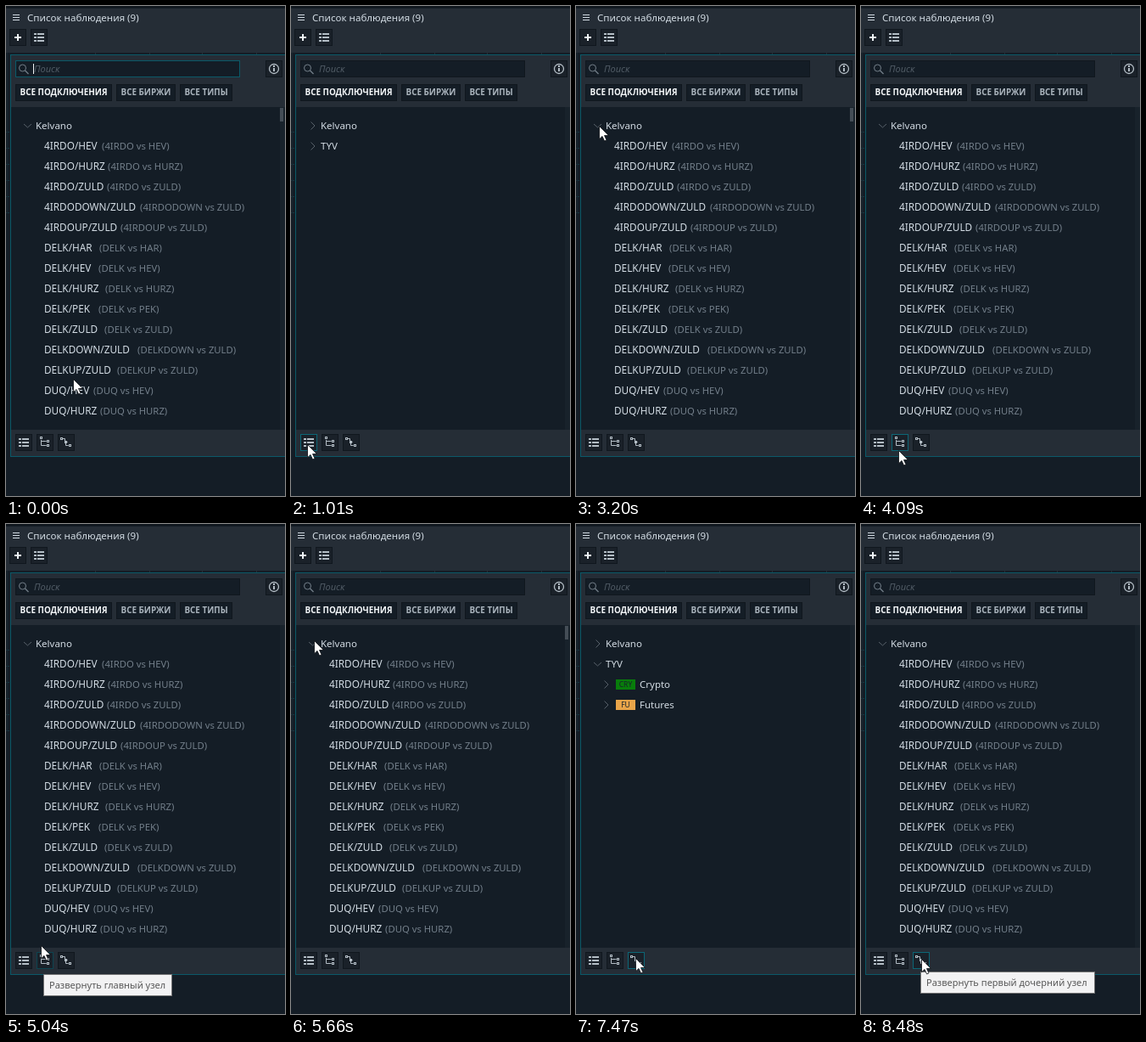
Write an HTML page that moves like this. It is 329 px wide and 577 px high and loops after 9.68 s.

```html
<!DOCTYPE html>
<html lang="ru">
<head>
<meta charset="utf-8">
<title>Список наблюдения</title>
<style>
  html, body { margin: 0; width: 100%; height: 100%; overflow: hidden; background: #141d26; }
  svg { display: block; width: 329px; height: 577px; font-family: "Noto Sans", "Open Sans", sans-serif; }
  rect { shape-rendering: crispEdges; }
  text { white-space: pre; }
</style>
</head>
<body>
<svg id="stage" viewBox="0 0 329 577"></svg>
<script>
const LOOP = 9680;
const INK = '#d3dce4', SOFT = '#b3bdc5', DIM = '#737f8a';
const DARK = '#141d26', KEY = '#1a2129', BAR = '#252d36', EDGE = '#10171e', TEAL = '#0b5968';
const stage = document.getElementById('stage');

function add(parent, tag, attrs, content) {
  const el = document.createElementNS('http://www.w3.org/2000/svg', tag);
  for (const k in attrs) el.setAttribute(k, attrs[k]);
  if (content) el.textContent = content;
  parent.appendChild(el);
  return el;
}
const group = (parent = stage) => add(parent, 'g', {});
const rect = (p, x, y, width, height, fill) => add(p, 'rect', { x, y, width, height, fill });
const box = (p, x, y, w, h, fill, stroke) =>
  add(p, 'rect', { x: x + .5, y: y + .5, width: w - 1, height: h - 1, fill, stroke });
const label = (p, x, y, s, fill, size, extra) =>
  add(p, 'text', { x, y, fill, 'font-size': size, ...extra }, s);
const line = (p, d, stroke, width = 1) =>
  add(p, 'path', { d, stroke, 'stroke-width': width, fill: 'none' });
const show = (el, on) => el.setAttribute('visibility', on ? 'visible' : 'hidden');

function chevron(p, x, y, open) {
  line(p, open ? `M${x - 4.5} ${y - 2}l4.5 4 4.5 -4` : `M${x - 2} ${y - 4.5}l4.5 4.5 -4.5 4.5`, '#58616a');
}
function dots(p, list) {
  for (const [x, y] of list) add(p, 'rect', { x: x + .5, y: y + .5, width: 2, height: 2, fill: 'none', stroke: SOFT });
}
function listIcon(p, x, y) {
  for (let i = 0; i < 3; i++) {
    rect(p, x, y + i * 4, 3, 2, SOFT);
    rect(p, x + 4, y + i * 4, 8, 2, SOFT);
  }
}

// Window behind the popup
rect(stage, 0, 0, 329, 577, DARK);
rect(stage, 0, 3, 329, 52, BAR);
rect(stage, 0, 0, 329, 2, '#0f161d');
for (const x of [105, 169, 231, 295]) rect(stage, x, 55, 1, 2, '#25313a');
for (let y = 148; y < 250; y += 19) rect(stage, 0, y, 4, 1, '#173640');
rect(stage, 1, 55, 1, 189, '#19252e');
for (const y of [11, 14, 17]) rect(stage, 8, y - 1, 8, 1, INK);
label(stage, 25, 18, 'Список наблюдения (9)', INK, 11.55);
for (const x of [4, 29]) box(stage, x, 27, 20, 20, KEY, EDGE);
line(stage, 'M10 37h8M14 33v8', '#eef3f6', 2);
listIcon(stage, 33, 32);

// Popup frame
rect(stage, 5, 57, 324, 474, TEAL);
rect(stage, 6, 58, 323, 61, BAR);
rect(stage, 6, 119, 323, 380, DARK);
rect(stage, 323, 119, 6, 380, '#18222b');
rect(stage, 6, 499, 323, 31, BAR);

const search = box(stage, 11, 64, 265, 20, DARK, EDGE);
add(stage, 'circle', { cx: 19.5, cy: 73, r: 4, fill: 'none', stroke: '#74808a' });
line(stage, 'M22.5 76l4 4', '#74808a', 1.3);
label(stage, 33, 78, 'Поиск', '#505b65', 11, { 'font-style': 'italic' });
const caret = rect(stage, 32, 68, 1, 12, '#f0f4f7');
box(stage, 306, 64, 20, 20, KEY, EDGE);
add(stage, 'circle', { cx: 316, cy: 74, r: 5.5, fill: 'none', stroke: SOFT, 'stroke-width': 1.3 });
rect(stage, 315, 73, 2, 4, SOFT);
rect(stage, 315, 70, 2, 2, SOFT);

[[11, 114, 'ВСЕ ПОДКЛЮЧЕНИЯ', '#f4f7f9'], [130, 70, 'ВСЕ БИРЖИ', '#aab4bd'], [205, 62, 'ВСЕ ТИПЫ', '#aab4bd']]
  .forEach(([x, w, s, fill]) => {
    box(stage, x, 92, w, 20, DARK, EDGE);
    label(stage, x + w / 2, 105, s, fill, 9.9, { 'font-weight': 700, 'text-anchor': 'middle' });
  });

// Tree views
const ROOT = 'Kelvano', SECOND = 'TYV';
function root(p, y, name, open) {
  chevron(p, 25.5, y, open);
  label(p, 35, y + 4, name, INK, 11.5);
}

const full = group();
root(full, 141, ROOT, true);
[
  ['4IRDO', 'HEV', 113], ['4IRDO', 'HURZ', 120], ['4IRDO', 'ZULD', 119],
  ['4IRDODOWN', 'ZULD', 158], ['4IRDOUP', 'ZULD', 135],
  ['DELK', 'HAR', 110], ['DELK', 'HEV', 109], ['DELK', 'HURZ', 117],
  ['DELK', 'PEK', 109], ['DELK', 'ZULD', 116], ['DELKDOWN', 'ZULD', 155],
  ['DELKUP', 'ZULD', 131], ['DUQ', 'HEV', 103], ['DUQ', 'HURZ', 111]
].forEach(([a, b, x], i) => {
  const y = 169 + 24 * i;
  label(full, 45, y, `${a}/${b}`, INK, 11.8);
  label(full, x, y, `(${a} vs ${b})`, DIM, 11.3);
});

const closed = group();
root(closed, 141, ROOT, false);
root(closed, 165, SECOND, false);

const second = group();
root(second, 141, ROOT, false);
root(second, 165, SECOND, true);
[['CRY', 'Crypto', '#087d0b'], ['FU', 'Futures', '#e8a449']].forEach(([tag, name, fill], i) => {
  const y = 189 + 24 * i;
  chevron(second, 35.5, y, false);
  add(second, 'rect', { x: 47, y: y - 6, width: 23, height: 12, rx: 1, fill });
  label(second, 58.5, y + 3, tag, '#17222b', 8.5, { 'text-anchor': 'middle' });
  label(second, 75, y + 4, name, INK, 11.5);
});
const bar = add(stage, 'rect', { x: 323, y: 120, width: 4, height: 16, rx: 1, fill: '#444d56' });

// Footer buttons
const buttons = [11, 36, 61].map(x => box(stage, x, 504, 20, 20, KEY, EDGE));
listIcon(stage, 15, 509);
line(stage, 'M41.5 511v6.5h6M41.5 512.5h6', SOFT);
dots(stage, [[40, 507], [48, 511], [48, 516]]);
line(stage, 'M67 509.5h2.5v4h3M70.5 513.5v4h3', SOFT);
dots(stage, [[64, 508], [69, 512], [74, 516]]);

function tip(x, y, w, s, start, fade, end) {
  const el = group();
  box(el, x, y, w, 26, '#f2f2f3', '#767676');
  label(el, x + 7, y + 17, s, '#575757', 11);
  return { el, start, fade, end };
}
const tips = [
  tip(19, 533, 116, 'Свернуть все узлы', 710, 150, 1010),
  tip(44, 530, 152, 'Развернуть главный узел', 4560, 230, 5100),
  tip(70, 527, 206, 'Развернуть первый дочерний узел', 7930, 170, LOOP)
];

const cursor = add(stage, 'path', {
  d: 'M.5 .5v15.2l3.5 -3.3 2.6 5.6 2.4 -1.1 -2.5 -5.4h4.9z',
  fill: '#fff', stroke: '#0b0f13', 'stroke-width': .8
});

// Pointer moves: first change, last change, steps, end x, end y, sideways bend
const START = [79, 439];
const MOVES = [
  [70, 540, 7, 20, 520, 0],
  [710, 710, 1, 19, 516, 0],
  [1960, 2510, 8, 24, 155, 38],
  [2590, 2670, 2, 24, 139, 0],
  [2820, 2970, 3, 27, 141, 0],
  [3600, 4090, 7, 44, 523, 0],
  [4180, 4330, 3, 44, 513, 0],
  [5040, 5040, 1, 41, 496, 0],
  [5100, 5510, 6, 27, 132, 0],
  [5660, 5760, 2, 27, 141, 0],
  [6150, 6460, 5, 44, 213, 0],
  [6550, 7080, 8, 76, 464, 0],
  [7150, 7470, 5, 70, 511, 0],
  [8480, 8480, 1, 71, 512, 0]
];
const ease = u => u * u * (3 - 2 * u);

function pointer(t) {
  let [x, y] = START;
  for (const [t0, t1, n, ex, ey, bend] of MOVES) {
    if (t < t0) break;
    const step = t >= t1 ? n : 1 + Math.floor((t - t0) / (t1 - t0) * (n - 1));
    const u = ease(step / n);
    x += (ex - x) * u + bend * 2 * u * (1 - u);
    y += (ey - y) * u;
    if (step < n) break;
  }
  return [Math.round(x), Math.round(y)];
}
const onButton = ([x, y], i) => x >= 11 + 25 * i && x < 31 + 25 * i && y >= 504 && y < 524;

function draw(t) {
  const now = pointer(t), before = pointer(t - 59);
  cursor.setAttribute('transform', `translate(${now})`);

  const view = t < 935 ? full : t < 3200 ? closed : t < 5910 ? full : t < 7630 ? second : full;
  for (const g of [full, closed, second]) show(g, g === view);

  // Hover effects linger briefly after the pointer leaves
  show(bar, view === full && before[1] > 118 && before[1] < 499);
  buttons.forEach((b, i) => {
    b.setAttribute('stroke', onButton(now, i) ? '#0c6676' : onButton(before, i) ? '#0d4450' : EDGE);
  });

  search.setAttribute('stroke', t < 935 ? TEAL : EDGE);
  show(caret, t < 305);
  for (const { el, start, fade, end } of tips) {
    show(el, t >= start && t < end);
    const k = Math.floor((t - start) / fade * 3) + 1;
    el.setAttribute('opacity', Math.max(0, Math.min(1, k / 4)));
  }
}

const begin = performance.now();
function frame() {
  draw((performance.now() - begin) % LOOP);
  requestAnimationFrame(frame);
}
frame();
</script>
</body>
</html>
```
